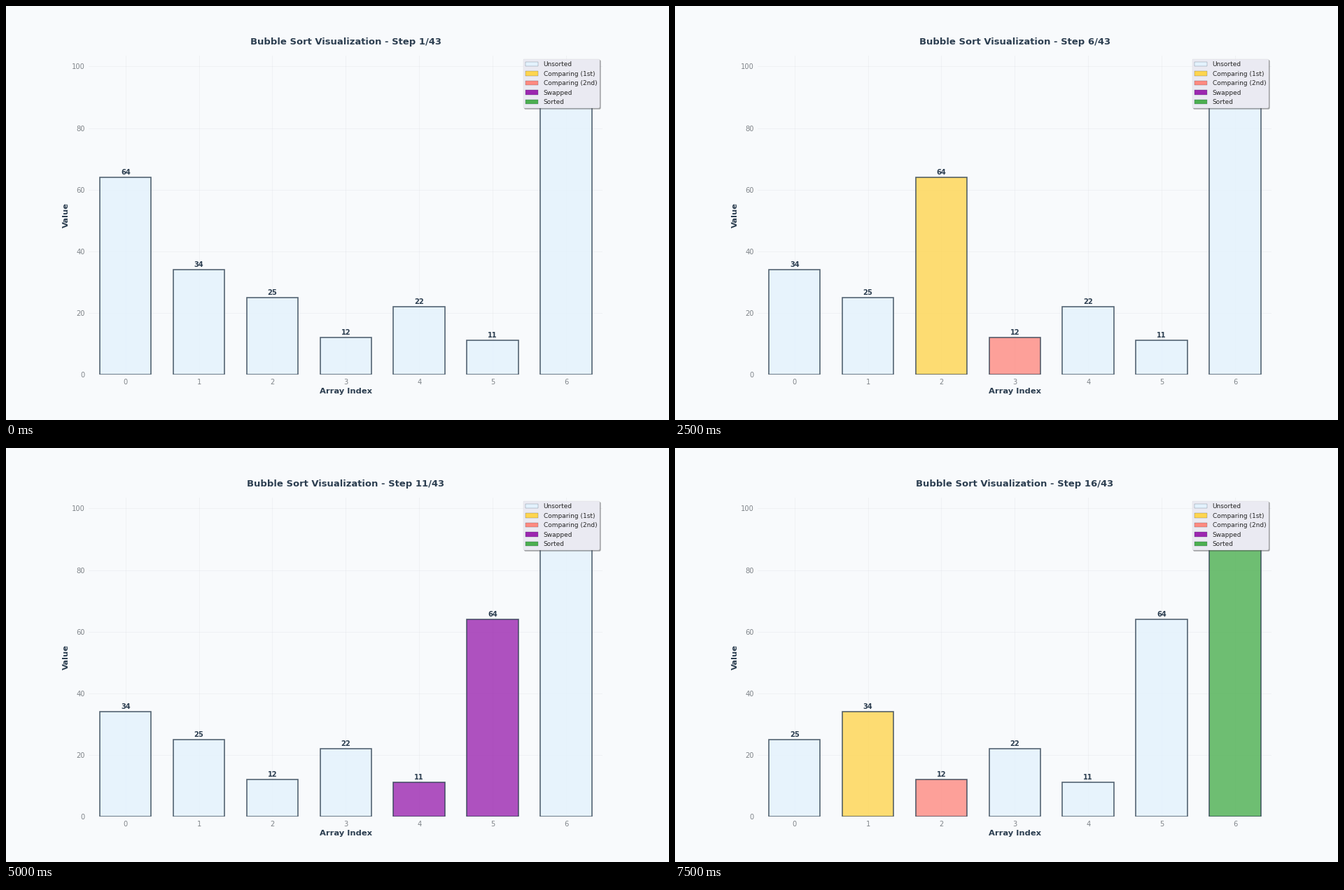
These frames come from a looping animation (947 by 592 pixels, 8000 ms). A matplotlib script:

```python
import matplotlib.pyplot as plt
from matplotlib.animation import FuncAnimation
from matplotlib.patches import Patch

VALUES = [64, 34, 25, 12, 22, 11, 90]
TOTAL_STEPS = 43
SHOWN_STEPS = 16
STEP_MS = 500

BG = "#F8FAFC"
INK = "#2C3E50"
COLORS = {
    "Unsorted": "#E3F2FD",
    "Comparing (1st)": "#FFD54F",
    "Comparing (2nd)": "#FF8A80",
    "Swapped": "#9C27B0",
    "Sorted": "#4CAF50",
}
PLAIN, FIRST, SECOND, SWAPPED, SORTED = COLORS.values()


def bubble_steps(values):
    """Yield (values, colours) for every step of the sort."""
    a, n = list(values), len(values)
    base = [PLAIN] * n

    def paint(marks):
        return [marks.get(k, c) for k, c in enumerate(base)]

    yield a[:], base[:]
    for end in range(n - 1, 0, -1):
        for j in range(end):
            yield a[:], paint({j: FIRST, j + 1: SECOND})
            if a[j] > a[j + 1]:
                a[j], a[j + 1] = a[j + 1], a[j]
                yield a[:], paint({j: SWAPPED, j + 1: SWAPPED})
        base[end] = SORTED
        yield a[:], base[:]


steps = list(bubble_steps(VALUES))[:SHOWN_STEPS]

plt.rcParams.update({
    "font.family": "DejaVu Sans",
    "patch.linewidth": 0.3,
    "axes.axisbelow": True,
    "toolbar": "None",
})

# 947 x 592 pixels
fig, ax = plt.subplots(figsize=(947.001 / 59.2, 10), dpi=59.2, facecolor=BG)
ax.set_facecolor(BG)
ax.spines[:].set_visible(False)
ax.set_xlim(-0.5, len(VALUES) - 0.5)
ax.set_ylim(0, max(VALUES) * 1.15)
ax.set_xticks(range(len(VALUES)))
ax.set_yticks(range(0, 101, 20))
ax.tick_params(length=0, pad=7, labelsize=12, labelcolor="#7F8489")
ax.grid(True, color="#D5D8DC", alpha=0.3, linewidth=1)

label_font = dict(fontsize=14, fontweight="bold", color=INK)
ax.set_xlabel("Array Index", **label_font)
ax.set_ylabel("Value", **label_font)
title = ax.set_title("", fontsize=16, fontweight="bold", color=INK, pad=20)

bars = ax.bar(range(len(VALUES)), VALUES, width=0.7, color=PLAIN,
              edgecolor=INK, linewidth=2, alpha=0.8)
labels = [ax.text(i, 0, "", ha="center", va="bottom", fontsize=12,
                  fontweight="bold", color=INK) for i in range(len(VALUES))]

ax.legend(handles=[Patch(facecolor=c, edgecolor=INK, label=name)
                   for name, c in COLORS.items()],
          loc="upper right", fontsize=11, frameon=True, fancybox=True,
          shadow=True, framealpha=1, facecolor="#EAEAF2", edgecolor="0.8",
          labelcolor="0.15")


def update(step):
    values, colors = steps[step]
    for bar, label, value, color in zip(bars, labels, values, colors):
        bar.set_height(value)
        bar.set_facecolor(color)
        label.set_y(value + 0.5)
        label.set_text(str(value))
    title.set_text(f"Bubble Sort Visualization - Step {step + 1}/{TOTAL_STEPS}")
    return [*bars, *labels, title]


anim = FuncAnimation(fig, update, frames=len(steps), interval=STEP_MS,
                     repeat=True, repeat_delay=0, blit=False)

plt.show()
```
